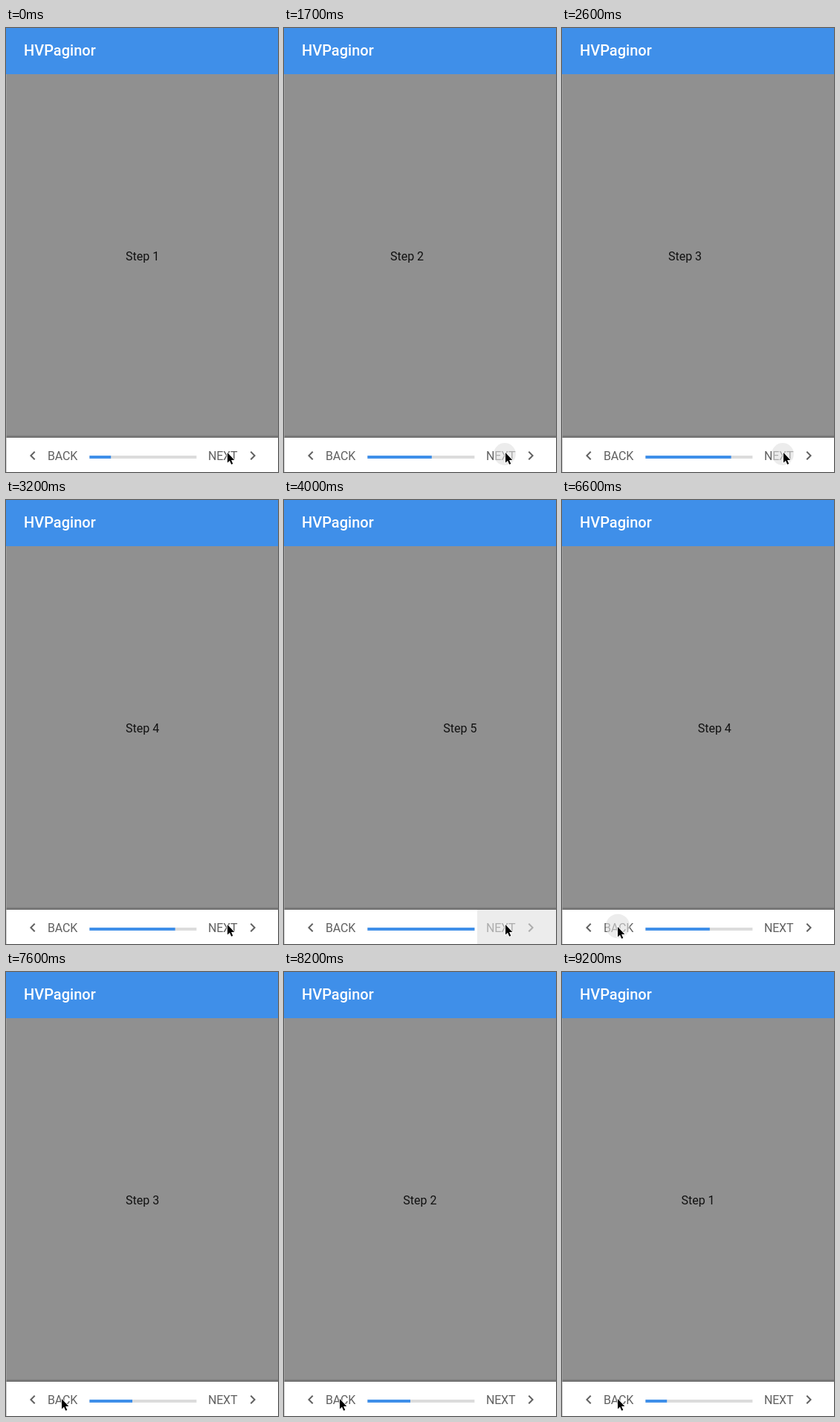
Animation, 366 px wide and 596 px high, one loop 10 s. Source, as an HTML page:

```html
<!DOCTYPE html>
<html lang="en">
<head>
<meta charset="utf-8">
<title>Stepper</title>
<style>
  html, body { margin: 0; width: 100%; height: 100%; overflow: hidden; }
  svg { display: block; width: 366px; height: 596px; font: 16px Roboto, sans-serif; }
  .buttons { fill: #616161; letter-spacing: -.2px; }
</style>
</head>
<body>
<svg viewBox="0 0 366 596">
  <defs>
    <linearGradient id="shade" x2="0" y2="1">
      <stop offset="0" stop-opacity="0"/>
      <stop offset="1" stop-opacity=".3"/>
    </linearGradient>
    <path id="chevron" d="M15.41 7.41 14 6l-6 6 6 6 1.41-1.41L10.83 12z"/>
    <clipPath id="backArea"><path d="M0 550h108v46H0z"/></clipPath>
    <clipPath id="nextArea"><path d="M260 550h106v46H260z"/></clipPath>
  </defs>

  <path fill="#909090" d="M0 0h366v596H0z"/>
  <path fill="#3f8fe9" d="M0 0h366v62H0z"/>
  <text x="24" y="37" font-size="20" font-weight="500" fill="#fff">HVPaginor</text>

  <g fill="#111">
    <text id="leaving" y="312"></text>
    <text id="entering" y="312"></text>
  </g>

  <path fill="url(#shade)" d="M0 546h366v4H0z"/>
  <path fill="#fff" d="M0 550h366v46H0z"/>
  <g class="buttons">
    <use href="#chevron" x="24" y="562"/>
    <text x="56" y="580">BACK</text>
    <text x="272" y="580">NEXT</text>
    <use href="#chevron" transform="translate(344 562) scale(-1 1)"/>
  </g>
  <path fill="#dcdcdc" d="M112.400 574h144v4h-144z"/>
  <rect id="bar" x="112.400" y="574" height="4" fill="#3f8fe9"/>
  <g id="rippleArea"><circle id="ripple" cy="572" fill="#e0e0e0"/></g>
  <path fill="#aaa" opacity=".6" d="M0 62h1v534H0z"/>
  <path id="cursor" d="M0 0v13.500l3-2.800 2.200 5.100 2.100-.9-2.200-5h4.200z" stroke="#fff" stroke-width="1.600" paint-order="stroke"/>
</svg>

<script>
const LOOP = 10000, TICK = 100, SLIDE = 600, WIDTH = 366, TEXT_X = 161;
const $ = id => document.getElementById(id);
const clamp = v => Math.min(1, Math.max(0, v));

// Each click: time, direction, start of the slide
const clicks = [
  [800, 1, 707], [1700, 1, 1628], [2600, 1, 2528], [3700, 1, 3647],
  [5600, -1, 5640], [6600, -1, 6522], [7600, -1, 7635], [8700, -1, 8630]
];

// cubic-bezier(.35, 0, .25, 1), solved by bisection
function ease(x) {
  if (x <= 0 || x >= 1) return clamp(x);
  let lo = 0, hi = 1;
  for (let i = 0; i < 24; i++) {
    const s = (lo + hi) / 2, r = 1 - s;
    if (1.05 * s * r * r + .75 * s * s * r + s ** 3 < x) lo = s; else hi = s;
  }
  return lo * lo * (3 - 2 * lo);
}

function place(id, step, offset) {
  $(id).textContent = 'Step ' + step;
  $(id).setAttribute('x', TEXT_X + offset);
}

function draw(t) {
  let step = 1, dir = 1, age = SLIDE;
  for (const [time, d, start] of clicks) {
    if (t < time) break;
    step += d;
    dir = d;
    age = t - start;
  }

  const p = ease(age / SLIDE);
  place('leaving', step - dir, -dir * p * WIDTH);
  place('entering', step, dir * (1 - p) * WIDTH);
  $('leaving').setAttribute('visibility', p < 1 ? 'visible' : 'hidden');
  $('bar').setAttribute('width', step * 28.8);

  $('rippleArea').setAttribute('clip-path', dir > 0 ? 'url(#nextArea)' : 'url(#backArea)');
  $('ripple').setAttribute('cx', dir > 0 ? 297 : 75);
  $('ripple').setAttribute('r', Math.max(0, age) * .207);
  $('ripple').setAttribute('opacity', .6 * clamp((550 - age) / 190));

  const m = clamp((t - 4600) / 800), k = m * m * (3 - 2 * m);
  $('cursor').setAttribute('transform', `translate(${298 - 223 * k} ${570 + 3 * k})`);
}

function tick() {
  draw(Math.floor(performance.now() % LOOP / TICK) * TICK);
  requestAnimationFrame(tick);
}
tick();
</script>
</body>
</html>
```
